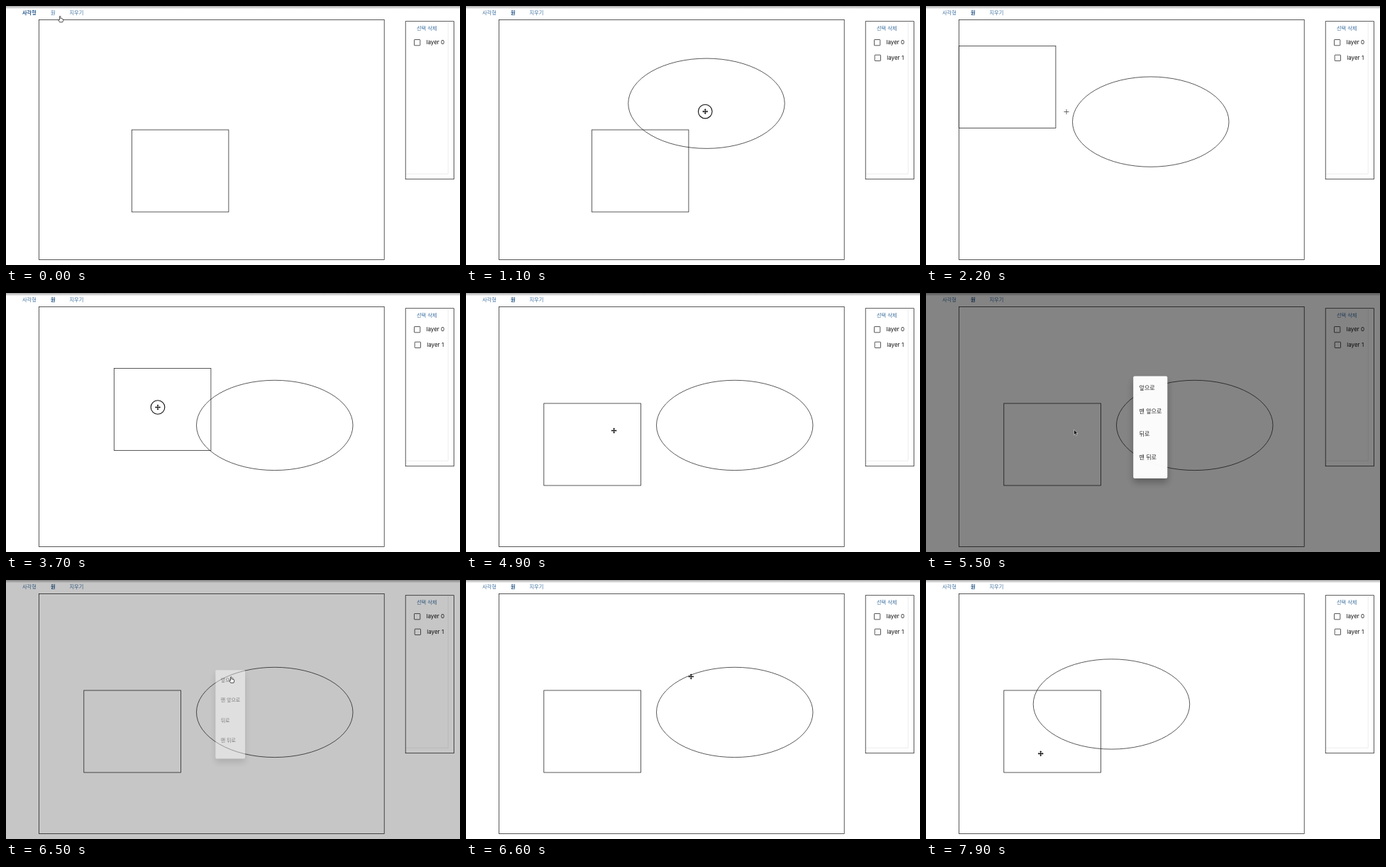
These frames come from a looping animation (640x366 px, 8000 ms). An HTML page:

```html
<!DOCTYPE html>
<html lang="ko">
<head>
<meta charset="utf-8">
<style>
  html, body { margin: 0; height: 100%; overflow: hidden; background: #fff; }
  svg { display: block; width: 640px; height: 366px; }
  .ko { font: 7.2px "Noto Sans CJK KR", sans-serif; fill: #3c6f9f; }
  .ko.on { font-weight: 700; fill: #2a5a8c; }
  .layer { font: 8px Inter, sans-serif; fill: #111; }
  .line { fill: none; stroke: #222; stroke-width: .75; }
  #menu { transform-origin: 316px 190px; }
  #menu rect { fill: #fff; filter: drop-shadow(0 6px 5px rgba(0, 0, 0, .28)); }
  #menu text { font: 8.1px "Noto Sans CJK KR", sans-serif; fill: #222; }
</style>
</head>
<body>
<svg viewBox="0 0 640 366">
  <defs>
    <linearGradient id="edge" x2="0" y2="1">
      <stop stop-color="#a8a8a8"/><stop offset="1" stop-color="#fff"/>
    </linearGradient>
  </defs>
  <rect width="640" height="4.5" fill="url(#edge)"/>
  <text class="ko" id="squareTool" x="23" y="12">사각형</text>
  <text class="ko" id="circleTool" x="63" y="12">원</text>
  <text class="ko" x="89.5" y="12">지우기</text>

  <rect class="line" x="46.4" y="19.4" width="486.8" height="339"/>
  <rect class="line" id="box"/>
  <ellipse class="line" id="oval"/>

  <path d="M623.3 23V237.3H564" fill="none" stroke="#e8e8e8" stroke-width=".8"/>
  <rect class="line" x="563.2" y="21.7" width="68.2" height="223"/>
  <text class="ko" x="579" y="33.7">선택 삭제</text>
  <rect class="line" x="575.5" y="47.5" width="8.3" height="8.3" rx=".6"/>
  <text class="layer" x="592.5" y="53.8">layer 0</text>
  <g id="layer1">
    <rect class="line" x="576.2" y="69.2" width="8.3" height="8.3" rx=".6"/>
    <text class="layer" x="593.3" y="75.7">layer 1</text>
  </g>

  <rect id="dim" width="640" height="366"/>
  <g id="menu">
    <rect x="292" y="117" width="48.5" height="145.5" rx="2"/>
    <text x="300.5" y="136.2">앞으로</text>
    <text x="300.5" y="169.4">맨 앞으로</text>
    <text x="300.5" y="202.6">뒤로</text>
    <text x="300.5" y="235.8">맨 뒤로</text>
  </g>

  <g id="cursor">
    <circle id="ring" r="9.8" fill="none" stroke="#111" stroke-width="1.1"/>
    <path id="hand" fill="#fff" stroke="#222" stroke-width=".8" stroke-linejoin="round"
      d="M-.8 .8Q0-.3 .8 .8V3.6Q2 3 2.4 4Q4.4 3.6 4.4 5.2V6.6L3.6 8.8H-.6L-2.6 5.6Q-2.6 4.4-.8 5.6Z"/>
    <path id="cross" fill="none" stroke="#444" stroke-width=".8" d="M-3.6 0H3.6M0-3.6V3.6"/>
    <path id="move" fill="#111"
      d="M0-4L1.6-2.2H.6V-.6H2.2V-1.6L4 0L2.2 1.6V.6H.6V2.2H1.6L0 4L-1.6 2.2H-.6V.6H-2.2V1.6L-4 0L-2.2-1.6V-.6H-.6V-2.2H-1.6Z"/>
    <path id="arrow" fill="#111" stroke="#fff" stroke-width=".5"
      d="M0-1.5V6.1L1.7 4.5L2.9 7.3L4.2 6.7L3 4.1H5.3Z"/>
  </g>
</svg>
<script>
const LOOP = 8000, STEP = 100, BOX_W = 136.6, BOX_H = 116;
const $ = id => document.getElementById(id);
const clamp = u => Math.min(1, Math.max(0, u));
const ramp = (t, from, to) => clamp((t - from) / (to - from));
const ease = u => u * u * (3 - 2 * u);

// Pointer strokes: [start, end, to x, to y, what is dragged along]
const strokes = [
  [100, 200, 76.2, 14, 'click'],
  [200, 400, 236.5, 65],
  [400, 700, 457, 192.3, 'size'],
  [700, 900, 345, 140],
  [1000, 1300, 315, 175, 'oval'],
  [1300, 1600, 239, 230],
  [1750, 2000, 108, 111.5, 'box'],
  [2100, 2200, 198, 149.5],
  [2200, 2400, 260, 165],
  [2400, 2600, 322, 188.3, 'oval'],
  [2600, 2800, 108, 111.5],
  [2900, 3000, 142, 127.5, 'box'],
  [3000, 3300, 163, 218, 'box'],
  [3300, 3700, 214, 161.5, 'box'],
  [3700, 3900, 171.5, 211, 'box'],
  [3900, 4600, 214, 122],
  [4600, 4800, 214, 122, 'click'],
  [4800, 4900, 208.6, 194.5],
  [5700, 6300, 317.3, 136.5],
  [6600, 6800, 343, 160],
  [6800, 7400, 225.7, 148.5, 'oval'],
  [7600, 7900, 161.7, 245.3]
];

function replay(t) {
  const s = { pointer: [76.2, 14], box: [177.3, 175], oval: [236.5, 65], size: [0, 0], click: [0, 0] };
  let [lastX, lastY] = s.pointer;
  for (const [start, end, x, y, dragged] of strokes) {
    const u = ease(ramp(t, start, end));
    for (const part of ['pointer', dragged]) {
      if (!part) continue;
      s[part][0] += (x - lastX) * u;
      s[part][1] += (y - lastY) * u;
    }
    if (dragged && t >= start && t < end) s.pressed = true;
    [lastX, lastY] = [x, y];
  }
  return s;
}

function pointerShape([x, y], [bx, by], oval, menuOpen) {
  if (menuOpen) return x > 292 ? 'hand' : 'arrow';
  if (y < 19) return 'hand';
  const inBox = x > bx && x < bx + BOX_W && y > by && y < by + BOX_H;
  const inOval = Math.hypot((x - oval.cx) / oval.rx, (y - oval.cy) / oval.ry) < 1;
  return inBox || inOval ? 'move' : 'cross';
}

function set(id, attrs) {
  for (const name in attrs) $(id).setAttribute(name, attrs[name]);
}
const show = (id, on) => set(id, { visibility: on ? 'visible' : 'hidden' });

function draw() {
  const t = Math.floor(performance.now() % LOOP / STEP) * STEP;
  const { pointer, box, oval: [ox, oy], size: [w, h], pressed } = replay(t);
  const oval = { cx: ox + w / 2, cy: oy + h / 2, rx: w / 2, ry: h / 2 };
  set('box', { x: box[0], y: box[1], width: BOX_W, height: BOX_H });
  set('oval', oval);

  $('squareTool').classList.toggle('on', t < 200);
  $('circleTool').classList.toggle('on', t >= 200);
  show('layer1', t >= 700);

  const open = ramp(t, 5350, 5505) - ramp(t, 6400, 6580);
  set('dim', { opacity: open / 2 });
  set('menu', { opacity: open });
  $('menu').style.transform = `scale(${.75 + open / 4})`;

  set('cursor', { transform: `translate(${pointer})` });
  const shape = pointerShape(pointer, box, oval, open > 0);
  for (const id of ['hand', 'cross', 'move', 'arrow']) show(id, id === shape);
  show('ring', pressed);

  requestAnimationFrame(draw);
}
draw();
</script>
</body>
</html>
```
